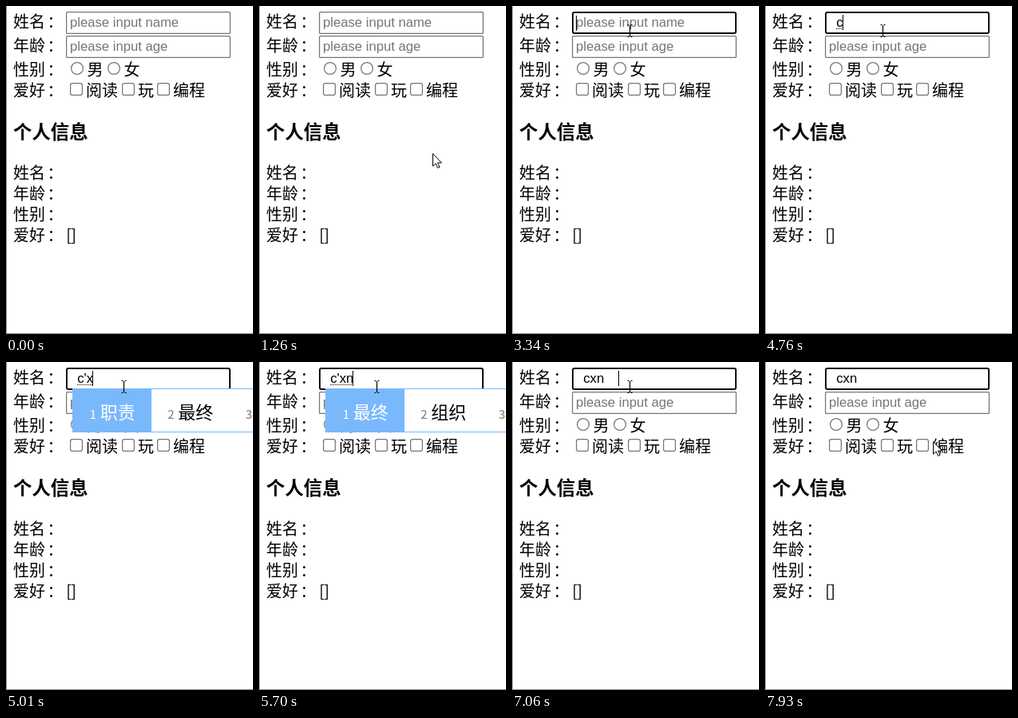
Write an HTML page that moves like this. It is 309 px wide and 410 px high and loops after 8000 ms.

```html
<!DOCTYPE html>
<html lang="zh-CN">
<head>
<meta charset="utf-8">
<style>
html, body { margin: 0; width: 100%; height: 100%; overflow: hidden; background: #fff; }
svg { display: block; }
text { white-space: pre; }
.zh { font-family: "Noto Sans CJK SC", "Noto Sans CJK", sans-serif; font-size: 20px; font-weight: 350; }
.field { font-family: "Liberation Sans", Arial, sans-serif; font-size: 16.667px; }
.hint { fill: #757575; }
.box { fill: #fff; stroke: #767676; stroke-width: 1.25; }
</style>
</head>
<body>
<svg id="stage" width="309" height="410" viewBox="0 0 309 410"></svg>
<script>
const LOOP = 8000;
const CARET_X = 79.4;
const TEXT_X = 80;
const EM = 16.667;
const ADVANCE = { " ": .278, "'": .191, c: .5, x: .5, n: .556 };
const stage = document.getElementById("stage");

function add(tag, attrs, parent = stage) {
  const el = document.createElementNS("http://www.w3.org/2000/svg", tag);
  for (const key in attrs) el.setAttribute(key, attrs[key]);
  parent.appendChild(el);
  return el;
}

function label(x, y, str, cls = "zh", attrs = {}, parent = stage) {
  const el = add("text", { x, y, class: cls, ...attrs }, parent);
  el.textContent = str;
  return el;
}

function rowLabel(y, str) {
  label(9, y, str);
  label(51.5, y, "：");
}

function input(y, hint) {
  return {
    y,
    frame: add("rect", { class: "box" }),
    hint: label(TEXT_X, y + 19, hint, "field hint")
  };
}

const show = (el, on) => el.setAttribute("visibility", on ? "visible" : "hidden");
const place = (el, x, y) => el.setAttribute("transform", `translate(${x} ${y})`);
const textWidth = str => [...str].reduce((sum, ch) => sum + ADVANCE[ch] * EM, 0);

// Form
const rows = ["姓名", "年龄", "性别", "爱好"];
[27, 57, 86.5, 113].forEach((y, i) => rowLabel(y, rows[i]));
const nameBox = input(7, "please input name");
const ageBox = input(37, "please input age");
[[89, "男"], [135, "女"]].forEach(([cx, str]) => {
  add("circle", { cx, cy: 78, r: 7.4, class: "box" });
  label(cx + 12.4, 86.5, str);
});
[[80, "阅读"], [145, "玩"], [189, "编程"]].forEach(([x, str]) => {
  add("rect", { x: x + .6, y: 96.6, width: 14.8, height: 14.8, rx: 2.5, class: "box" });
  label(x + 20, 113, str);
});

// Summary
label(9, 166, "个人信息", "zh", { style: "font-size:23.4px;font-weight:700" });
rows.forEach((str, i) => rowLabel(216 + 26 * i, str));
label(75.3, 293.5, "[]", "zh", { "letter-spacing": -.8 });
add("path", { d: "M.5 0V409.5H309", fill: "none", stroke: "#8c8c8c" });

// Typed text and caret
const typedEl = label(TEXT_X, 26, "", "field");
const underline = add("path", { stroke: "#000", "stroke-dasharray": "1 1" });
const caret = add("rect", { width: 1, height: 19, fill: "#000" });

// Input method popup
const popup = add("g", {});
add("rect", { x: 83, y: 33, width: 230, height: 55, fill: "#fff" }, popup);
add("path", { d: "M83 33.5H309M83 87.5H309", stroke: "#7ab8fc" }, popup);
add("rect", { x: 83, y: 33, width: 99, height: 55, fill: "#7ab8fc" }, popup);
const words = [0, 1, 2].map(i => {
  const x = 104.7 + 97.5 * i;
  const num = { style: "font-size:15px", fill: i ? "#777" : "#fff" };
  label(x, 71, i + 1, "zh", num, popup);
  return label(x + 13, 71, "", "zh", { style: "font-size:22px", fill: i ? "#000" : "#fff" }, popup);
});

// Pointers
const arrow = add("path", {
  d: "M.5 .5V16.2L4.1 12.9L6.6 18.4L9 17.4L6.6 12H11.4Z",
  fill: "#fff", stroke: "#000", "stroke-linejoin": "round"
});
const beam = add("path", {
  d: "M-3 -7.5H-1M1 -7.5H3M-3 7.5H-1M1 7.5H3M0 -7V7",
  fill: "none", stroke: "#000", "stroke-width": 1.2
});

// time, x, y, pointer, hovered field
const pointerSteps = [
  [0, 0, 0, ""],
  [710, 299, 248, "arrow"],
  [840, 273, 220, "arrow"],
  [990, 246, 210, "arrow"],
  [1120, 228, 199, "arrow"],
  [1260, 217, 184, "arrow"],
  [1410, 172, 112, "arrow"],
  [1540, 139.5, 60.5, "beam", "age"],
  [1690, 132.5, 42.5, "beam", "age"],
  [1830, 137.5, 36.5, "beam"],
  [1960, 143.5, 32.5, "beam", "name"],
  [2080, 147.5, 31, "beam", "name"],
  [7780, 188, 69, "arrow", "age"],
  [7930, 210, 99, "arrow"]
];

// time, text, caret shown, composing, candidates
const typingSteps = [
  [0, "", false],
  [2350, "", true],
  [2910, "", false],
  [3340, "", true],
  [3620, " ", true],
  [3990, "  ", true],
  [4490, "  ", false],
  [4760, "  c", true, true],
  [4890, "  c", true, true, ["在", "这", "中"]],
  [5010, "  c'x", true, true, ["职责", "最终", "组织"]],
  [5560, "  c'x", false, true, ["职责", "最终", "组织"]],
  [5700, "  c'xn", true, true, ["最终", "组织", "支柱"]],
  [5960, "  cxn", true],
  [6520, "  cxn ", true],
  [6640, "  cxn  ", true],
  [6780, "  cxn   ", true],
  [7060, "  cxn    ", true],
  [7210, "  cxn     ", true],
  [7780, "  cxn     ", false]
];

const stepAt = (steps, t) => steps.reduce((now, step) => step[0] <= t ? step : now);

function paintFrame({ frame, y }, focused, hovered) {
  const line = focused ? 2 : 1.25;
  frame.style.stroke = focused ? "#101010" : hovered ? "#4f4f4f" : "#767676";
  frame.style.strokeWidth = line;
  frame.setAttribute("x", 75 + line / 2);
  frame.setAttribute("y", y + line / 2);
  frame.setAttribute("width", 206 - line);
  frame.setAttribute("height", 28 - line);
  frame.setAttribute("rx", focused ? 2 : 1);
}

function render(t) {
  const [, px, py, kind, hover] = stepAt(pointerSteps, t);
  const [, str, caretOn, composing, candidates] = stepAt(typingSteps, t);

  paintFrame(nameBox, t >= 2350, hover === "name");
  paintFrame(ageBox, false, hover === "age");
  show(nameBox.hint, !str);
  typedEl.textContent = str;

  const end = Math.max(80, Math.floor(CARET_X + textWidth(str)));
  show(caret, caretOn);
  place(caret, end, str ? 11 : 12);
  show(underline, composing);
  underline.setAttribute("d", `M89 28.5H${end}`);

  show(popup, candidates);
  if (candidates) words.forEach((el, i) => { el.textContent = candidates[i]; });

  show(arrow, kind === "arrow");
  show(beam, kind === "beam");
  place(kind === "beam" ? beam : arrow, px, py);
}

function tick() {
  render(performance.now() % LOOP);
  requestAnimationFrame(tick);
}
tick();
</script>
</body>
</html>
```
